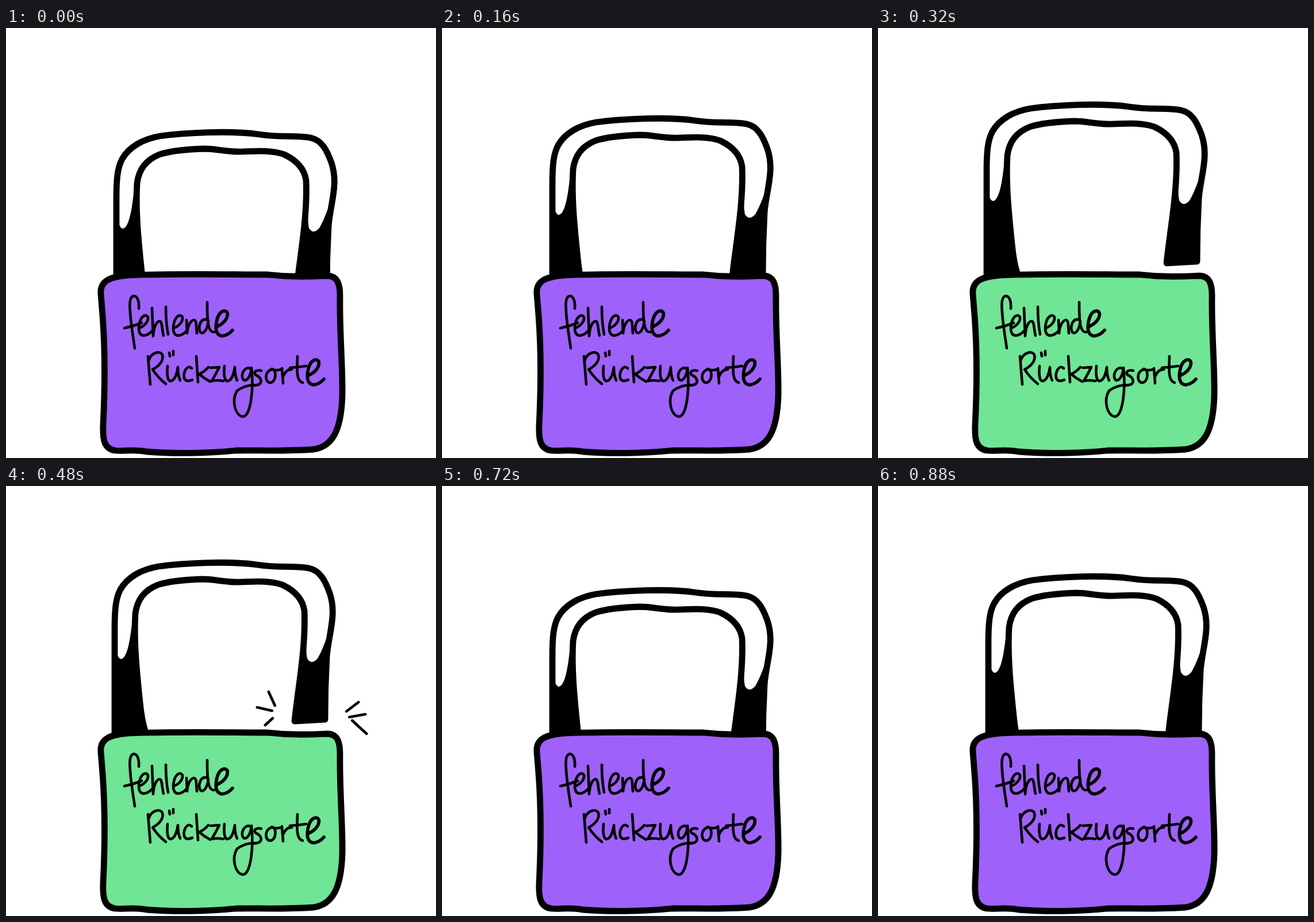
These frames come from a looping animation (748x748 px, 0.96 s). An HTML page:

```html
<!DOCTYPE html>
<html lang="de">
<head>
<meta charset="utf-8">
<title>fehlende Rückzugsorte</title>
<style>
  html, body { margin: 0; width: 100%; height: 100%; overflow: hidden; background: #fff; }
  svg { display: block; width: 100vw; height: 100vh; }
  .line { stroke: #000; stroke-width: 10.8; stroke-linejoin: round; }
  .pen { fill: none; stroke: #000; stroke-width: 4.6; stroke-linecap: round; stroke-linejoin: round; }
</style>
</head>
<body>
<svg viewBox="0 0 748 748" role="img" aria-label="fehlende Rückzugsorte">
  <g id="shackle">
    <path class="line" fill="#fff" d="M192 500V296C192 262 194 243 202 228C214 207 238 193 268 188
      C312 182 390 178 440 185C478 191 505 186 530 191C549 195 558 212 566 234
      C579 272 564 306 561 345Q558 400 558 454L505 457
      C510 405 525 330 522 265C519 244 505 230 484 220C456 210 420 216 400 215
      C378 214 362 210 345 210C315 211 285 214 267 220C244 229 231 246 228 270
      C225 320 231 375 236 424Q239 455 245 474V500Z"/>
    <path d="M192 330C198 346 200 349 204 349C216 345 220 305 223 280L228 300L236 424L245 500H192Z"/>
    <path d="M570 285C562 310 553 335 545 348Q534 360 527 348Q524 335 526 300L521 310L505 457L558 454L562 340Z"/>
  </g>
  <path id="body" class="line" d="M165 463C163 440 180 433 212 430C300 427 390 429 455 429
    C500 434 530 432 560 431C576 432 581 444 581 466C580 530 586 590 585 640
    C583 700 568 728 535 733C470 737 440 734 400 735C350 740 290 741 245 737
    C220 732 205 737 190 735C170 732 168 715 169 690C173 610 171 540 168 500Z"/>
  <g id="words" class="pen"></g>
  <g id="sparks" class="pen">
    <path id="left" d="M462 358L473 382M442 385L468 391M456 416L469 404"/>
    <path id="right" d="M587 392L608 376M592 402L620 397M597 408L622 431"/>
  </g>
</svg>
<script>
const $ = id => document.getElementById(id);
const STEP = 80, SLOTS = 12, CYCLE = 9, OPEN = 4;

// Handwriting: advance width and pen strokes, baseline at y = 0
const u = 'M0-29C-2-8 2-2 6-3C13-4 17-18 18-27Q18-12 22-4';
const glyphs = {
  f: [24, 'M25-44C26-60 21-66 16-66C6-64 10-40 11-25Q14 0 18 25M0-10Q15-13 30-19'],
  e: [24, 'M2-10C12-14 18-22 17-29C14-35 5-32 2-18C-1-4 3 3 10 3Q18 2 24-5'],
  h: [24, 'M0-45Q1-20 2 4C3-16 10-22 13-22C18-22 17-8 20 3'],
  l: [12, 'M0-47Q0-20 4 1'],
  n: [21, 'M0-24L1-1C2-17 9-24 13-24C18-24 17-10 18-1'],
  d: [29, 'M14-25C2-27-1-10 3-3C8 2 15-6 17-22M15-55C15-30 15-2 27-3'],
  R: [34, 'M0-46Q2-20 4 3M1-38C6-54 22-56 25-48C28-38 18-28 8-23Q18-8 31 2'],
  u: [24, u],
  ü: [24, u + 'M3-52l1 6M10-55l0 7'],
  c: [25, 'M18-25C10-33 3-18 5-8C8-1 14-3 19-5'],
  k: [25, 'M1-46L4-1M22-27Q14-18 6-15Q14-8 25-2'],
  z: [25, 'M1-26L16-27Q10-15 3-3Q12-5 23-3'],
  g: [27, 'M21-25C10-29 3-12 9-5C15-1 22-12 23-26C27 10 22 59 8 59C-6 57-12 30-2 14Q12 4 28 4'],
  s: [21, 'M13-21C2-23-1-17 4-13C12-10 16-1 9 3Q4 5-3 5'],
  o: [28, 'M11-23C-2-22-3 0 8 0C18-1 20-23 10-24Q16-20 26-23'],
  r: [22, 'M0-25L2 1M2-11Q8-24 17-23'],
  t: [21, 'M5-46C4-20 3-3 14 0M-8-26Q6-27 20-29']
};

// The last letter of a word is written larger
function write(word, x, y) {
  [...word].forEach((ch, i) => {
    const [advance, d] = glyphs[ch];
    const size = i === word.length - 1 ? 1.25 : 1;
    const el = document.createElementNS('http://www.w3.org/2000/svg', 'path');
    el.setAttribute('d', d);
    el.setAttribute('transform', `translate(${x} ${y}) scale(${size})`);
    el.setAttribute('vector-effect', 'non-scaling-size');
    $('words').append(el);
    x += advance;
  });
}
write('fehlende', 206, 532);
write('Rückzugsorte', 247, 617);

// Holds valueAt(step) for each step; the lock's cycle restarts after CYCLE steps
function play(id, prop, valueAt) {
  const frames = Array.from({ length: SLOTS + 1 }, (_, i) => ({
    [prop]: valueAt(Math.min(i, SLOTS - 1) % CYCLE), offset: i / SLOTS, easing: 'step-end'
  }));
  $(id).animate(frames, { duration: STEP * SLOTS, iterations: Infinity }).startTime = 0;
}

const move = (x, y = 0) => `translate(${x}px, ${y}px)`;
const lift = i => move(i < OPEN ? 0 : -3, -12 * i - i % 2);
const spread = i => 6 * Math.sin((i - OPEN - 1) * Math.PI * 2 / 3);

play('shackle', 'transform', i => lift(Math.min(i, OPEN)));
play('body', 'fill', i => i < OPEN ? '#9e61fa' : '#6fe595');
play('sparks', 'opacity', i => i > OPEN ? 1 : 0);
play('left', 'transform', i => move(-spread(i)));
play('right', 'transform', i => move(spread(i)));
</script>
</body>
</html>
```
